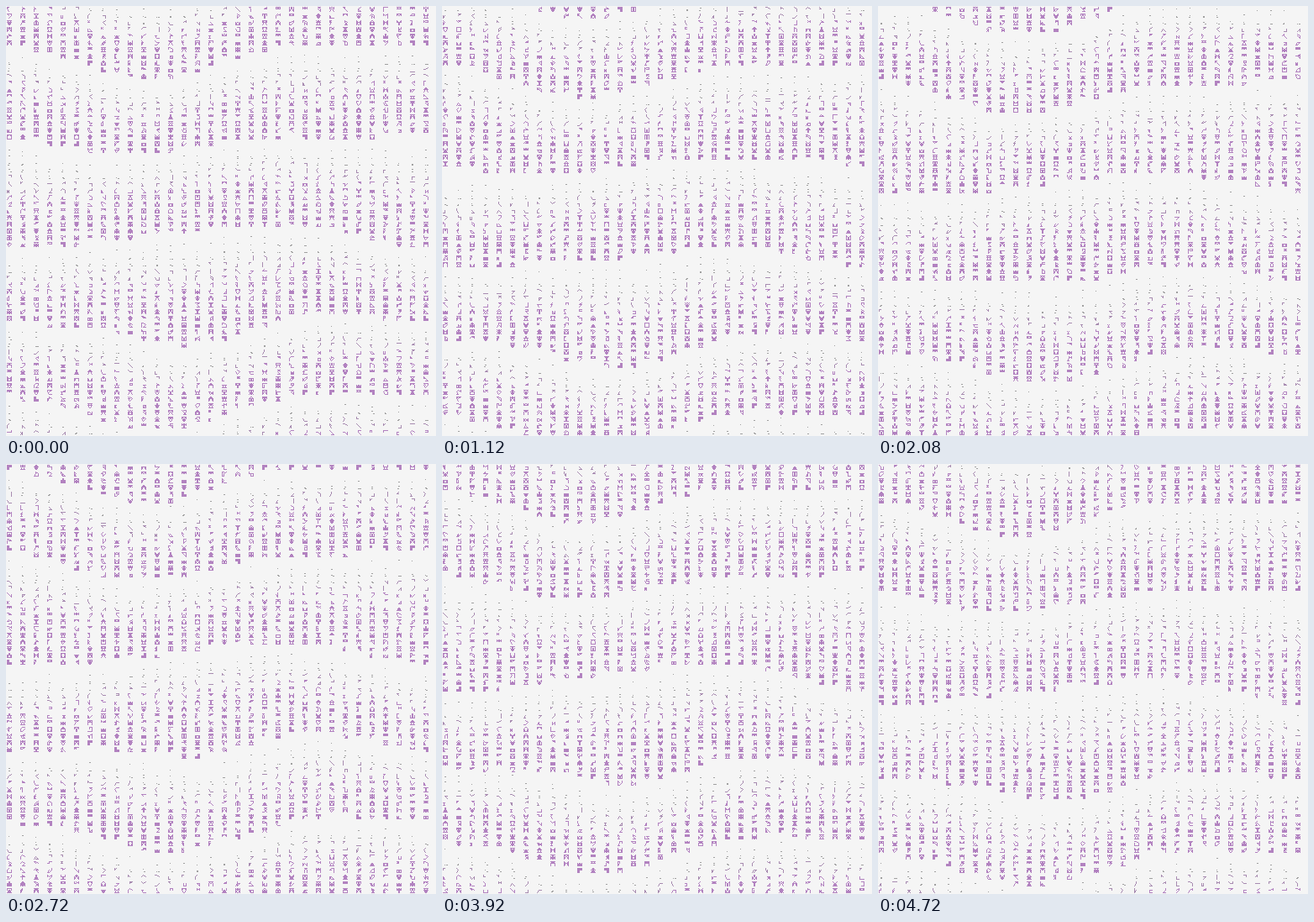
Animation, 512 px wide and 512 px high, one loop 4800 ms. Source, as an HTML page with a canvas:

```html
<!DOCTYPE html>
<html lang="en">
<head>
<meta charset="utf-8">
<title>Glyph rain</title>
<style>
  html, body { margin: 0; height: 100%; overflow: hidden; background: #f5f5f5; }
  canvas { display: block; }
</style>
</head>
<body>
<canvas id="stage" width="512" height="512"></canvas>
<script>
const ctx = document.getElementById('stage').getContext('2d');
const SIZE = 512, CELL = 8, STREAMS = 5, STEPS = 60, STEP_MS = 80;
const PAPER = '#f5f5f5', PURPLE = '#b282c0', MAUVE = '#a78bb0', GRAY = '#a0a0a0';
const { sin, cos, floor, round, abs, max, min } = Math;

let seed = 1;
function random() {
  seed = (seed + 0x6D2B79F5) | 0;
  let z = Math.imul(seed ^ (seed >>> 15), seed | 1);
  z ^= z + Math.imul(z ^ (z >>> 7), z | 61);
  return ((z ^ (z >>> 14)) >>> 0) / 4294967296;
}
const pick = n => floor(random() * n);

// Falling sawtooth, bent by smooth waves that tile in both directions.
function phase(x, y) {
  const a = x / SIZE * 2 * Math.PI, b = y / SIZE * 2 * Math.PI;
  return y * STREAMS / SIZE - 0.7 + 0.07 * cos(b - 1.4)
    + cos(a) * (0.035 + 0.11 * cos(b) + 0.05 * cos(2 * b - 3.5))
    - sin(a) * (0.125 - 0.065 * cos(b - 3.3))
    + cos(2 * a) * 0.055 * cos(b - 1.2)
    + sin(2 * a) * (0.035 + 0.025 * cos(b));
}

const NODES = [1, 3, 6];

function stroke(x, y, from, to, mirror) {
  const x1 = NODES[from.i], y1 = NODES[from.j];
  const dx = NODES[to.i] - x1, dy = NODES[to.j] - y1;
  const length = max(abs(dx), abs(dy));
  for (let k = 0; k <= length; k++) {
    const px = x1 + round(dx * k / length), py = y1 + round(dy * k / length);
    ctx.fillRect(x + px, y + py, 1, 1);
    if (mirror) ctx.fillRect(x + 7 - px, y + py, 1, 1);
  }
}

// A connected walk over a small lattice; dense glyphs are often symmetric.
function glyph(x, y, strokes) {
  const mirror = strokes > 3 && random() < 0.6;
  const columns = mirror ? 2 : 3;
  let node = { i: pick(columns), j: pick(3) }, last = node;
  for (let k = 0; k < strokes; k++) {
    let next;
    do {
      next = { i: pick(columns), j: pick(3) };
    } while (abs(next.i - node.i) > 1 || abs(next.j - node.j) > 1
      || (next.i === node.i && next.j === node.j)
      || (next.i === last.i && next.j === last.j));
    stroke(x, y, node, next, mirror);
    last = node;
    node = next;
  }
}

function block(x, y) {
  const gap = pick(4);
  for (let q = 0; q < 4; q++) {
    if (q !== gap) ctx.fillRect(x + 1 + q % 2 * 3, y + 1 + (q >> 1) * 3, 3, 3);
  }
}

function drawCell(x, y, level, isHead) {
  if (level < 0.08) return;
  ctx.fillStyle = level < 0.3 ? GRAY : level < 0.42 ? MAUVE : PURPLE;
  if (isHead && random() < 0.15) {
    block(x, y);
  } else if (level < 0.3) {
    if (level < 0.2 && random() < 0.4) return;
    ctx.fillRect(x + 3, y + 2 + pick(4), 1 + pick(2), 1);
    if (level > 0.2) ctx.fillRect(x + 2 + pick(4), y + 5, 2, 1);
  } else {
    glyph(x, y, round(min(6, 1.5 + (level - 0.3) * 10)));
  }
}

function drawStep(step) {
  seed = step * 7919 + 17;
  ctx.fillStyle = PAPER;
  ctx.fillRect(0, 0, SIZE, SIZE);
  for (let x = 0; x < SIZE; x += 2 * CELL) {
    for (let y = 0; y < SIZE; y += CELL) {
      const here = phase(x, y + CELL) - step / STEPS;
      const below = phase(x, y + 2 * CELL) - step / STEPS;
      drawCell(x, y, here - floor(here), floor(below) > floor(here));
    }
  }
}

let shown = -1;
function tick() {
  const step = floor(performance.now() / STEP_MS) % STEPS;
  if (step !== shown) drawStep(shown = step);
  requestAnimationFrame(tick);
}
tick();
</script>
</body>
</html>
```
